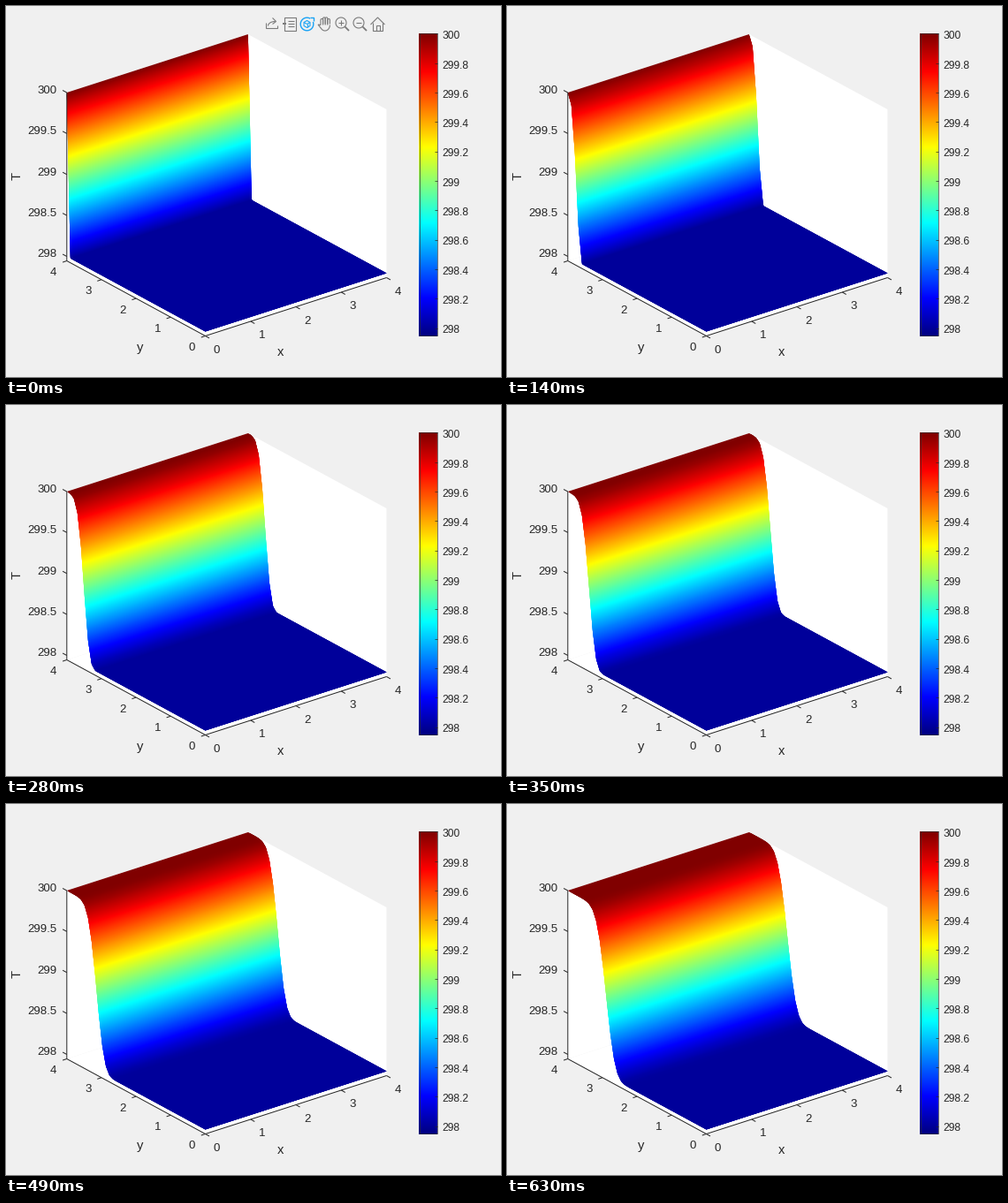
Animation, 560 px wide and 420 px high, one loop 0.7 s. Source, as a matplotlib script:

```python
from math import comb

import numpy as np
import matplotlib.pyplot as plt
from matplotlib.animation import FuncAnimation
from matplotlib.collections import PolyCollection
from matplotlib.patches import Polygon, Rectangle

W, H, DPI = 560, 420, 100
FRAMES, INTERVAL = 10, 70
PX = 72 / DPI
INK, GREY, BLUE = "#262626", "#7a7a7a", "#1aa3f5"

SIDE, Z_LO, Z_HI, T_COLD = 4, 297.946, 300.0, 298.0
CELLS, COURANT = 39, 0.6

# screen vectors of the whole box edges
ORIGIN = np.array([225.0, 373.0])
X_EDGE = np.array([205.0, -66.0])
Y_EDGE = np.array([-156.7, -85.0])
Z_EDGE = np.array([0.0, -190.5])

plt.rcParams["font.family"] = "Liberation Sans"
fig = plt.figure(figsize=(W / DPI, H / DPI), dpi=DPI, facecolor="#f0f0f0")
ax = fig.add_axes([0, 0, 1, 1])


def height(t):
    return (np.asarray(t) - Z_LO) / (Z_HI - Z_LO)


def project(x, y, z):
    u, v, w = (np.asarray(a, float)[..., None]
               for a in (x / SIDE, y / SIDE, height(z)))
    return ORIGIN + u * X_EDGE + v * Y_EDGE + w * Z_EDGE


def jet(t):
    return np.clip(1.5 - np.abs(4 * height(t)[..., None] - [3, 2, 1]), 0, 1)


def line(pts, color=INK, width=1.0, z=5):
    xs, ys = zip(*pts)
    return ax.plot(xs, ys, color=color, lw=width * PX, zorder=z,
                   solid_capstyle="butt", solid_joinstyle="miter")[0]


def label(x, y, text, size, ha="center"):
    """Place text with its capitals centred on y."""
    ax.text(x, y + 0.35 * size, text, size=size * PX, color=INK, ha=ha,
            va="baseline", zorder=6)


def draw_box():
    for start, a, b in ((ORIGIN, X_EDGE, Y_EDGE),
                        (ORIGIN + X_EDGE, Y_EDGE, Z_EDGE),
                        (ORIGIN + Y_EDGE, X_EDGE, Z_EDGE)):
        ax.add_patch(Polygon([start, start + a, start + a + b, start + b],
                             fc="white", lw=0, zorder=1))
    line([ORIGIN + X_EDGE, ORIGIN, ORIGIN + Y_EDGE, ORIGIN + Y_EDGE + Z_EDGE])

    for v in range(SIDE + 1):
        p = project(v, 0, Z_LO)
        line([p, p + (4.5, 2.5)])
        label(p[0] + 13, p[1] + 14.5, str(v), 13.3)
        p = project(0, v, Z_LO)
        line([p, p + (-4.7, 1.6)])
        label(p[0] - 15, p[1] + 12, str(v), 13.3)
    for v in np.arange(T_COLD, Z_HI + 0.1, 0.5):
        p = project(0, SIDE, v)
        line([p, p + (-4.7, -2.5)])
        label(57, p[1] - 3.7, f"{v:g}", 13.3, "right")

    label(310, 390, "x", 14.7)
    label(151.5, 385, "y", 14.7)
    ax.text(12, 192, "T", size=14.7 * PX, color=INK, rotation=90,
            ha="center", va="center")


def draw_colorbar():
    left, right, top, bottom = 467, 487, 31, 373
    ramp = jet(np.linspace(Z_HI, Z_LO, 256))[:, None, :]
    ax.imshow(ramp, extent=(left - 0.5, right + 0.5, bottom + 0.5, top - 0.5),
              aspect="auto", interpolation="bilinear", zorder=3)
    ax.add_patch(Rectangle((left, top), right - left, bottom - top, fill=False,
                           ec=INK, lw=0.6 * PX, zorder=4))
    for v in np.linspace(T_COLD, Z_HI, 11):
        y = bottom + (top - bottom) * height(v)
        line([(right - 3, y), (right, y)], width=0.7)
        label(492.5, y + 1.5, f"{v:.4g}", 12, "left")


def arc(cx, cy, rx, ry, start=0, stop=360):
    a = np.radians(np.linspace(start, stop, 40))
    return list(zip(cx + rx * np.cos(a), cy + ry * np.sin(a)))


def draw_toolbar():
    parts = []

    def stroke(pts, color=GREY, width=1.1):
        parts.append(line(pts, color, width, 8))

    def frame(x, y, w, h):
        parts.append(ax.add_patch(Rectangle((x, y), w, h, fill=False, ec=GREY,
                                            lw=1.1 * PX, zorder=8)))

    # export: tray and bent arrow
    stroke([(293, 19), (293, 25), (306, 25), (306, 22)])
    stroke(arc(304, 22, 8, 5, 180, 270))
    stroke([(301, 13), (305, 17), (301, 20)])

    # data tip
    frame(314.5, 12.5, 13, 15)
    for y in (17, 20, 23):
        stroke([(318, y), (325, y)])
    stroke([(312, 20), (316, 20)], width=2)

    # rotate: cube inside a turning arrow
    stroke(arc(340, 20, 7.3, 7.3, -20, 300), BLUE, 1.4)
    stroke([(343, 12.5), (347, 12.5), (347, 16.5)], BLUE, 1.4)
    cube = [(340 + 4 * np.sin(a), 20 - 4 * np.cos(a))
            for a in np.radians(range(0, 361, 60))]
    stroke(cube, BLUE)
    for corner in cube[1:6:2]:
        stroke([(340, 20), corner], BLUE)

    # pan: four fingers, palm and thumb
    for k in range(4):
        x, tip = 356.8 + 2.6 * k, 13.5 + 0.8 * (k - 1.5) ** 2
        stroke([(x - 1.3, 21), *arc(x, tip, 1.3, 1.3, 180, 360), (x + 1.3, 20)])
    stroke([*arc(360.4, 21, 5.5, 6.5, 0, 130), (352.5, 20.5), (355.5, 21)])

    # zoom in and out
    for x in (378.5, 398.5):
        stroke(arc(x, 18.5, 6, 6))
        stroke([(x + 4.3, 22.8), (x + 9, 27.5)], width=1.8)
        stroke([(x - 3, 18.5), (x + 3, 18.5)])
    stroke([(378.5, 15.5), (378.5, 21.5)])

    # home
    stroke([(412, 20.5), (420, 12.5), (428, 20.5)])
    stroke([(414.5, 18.5), (414.5, 27.5), (425.5, 27.5), (425.5, 18.5)])
    frame(418, 22, 4, 5.5)
    return parts


def profile(steps):
    """Upwind advection of a hot wall: binomial tail over the cells."""
    p = [comb(steps, k) * COURANT**k * (1 - COURANT)**(steps - k)
         for k in range(steps + 1)]
    tail = [sum(p[j:]) for j in range(CELLS + 1)]
    return T_COLD + (Z_HI - T_COLD) * np.array(tail)


def strips(steps):
    """Cut the surface into bands one pixel long on screen, with colours."""
    y, t = np.linspace(SIDE, 0, CELLS + 1), profile(steps)
    hops = np.diff(project(0 * y, y, t), axis=0)
    run = np.append(0, np.cumsum(np.hypot(*hops.T)))
    # keep the grid nodes so that the kinks stay sharp
    s = np.union1d(np.arange(0, run[-1]), run)
    y, t = np.interp(s, run, y), np.interp(s, run, t)
    near = project(0 * y, y, t)
    far = near + X_EDGE
    # each band reaches under the next ones, so no seams show
    a = np.arange(len(s) - 1)
    b = np.minimum(a + 4, len(s) - 1)
    quads = np.stack([near[a], far[a], far[b], near[b]], axis=1)
    return quads, jet((t[:-1] + t[1:]) / 2)


draw_box()
draw_colorbar()
toolbar = draw_toolbar()
surface = PolyCollection([], linewidths=0, zorder=2)
ax.add_collection(surface)
ax.set(xlim=(-0.5, W - 0.5), ylim=(H - 0.5, -0.5))
ax.axis("off")


def update(i):
    quads, colors = strips(max(2 * i - 1, 0))
    surface.set_verts(quads)
    surface.set_facecolor(colors)
    for part in toolbar:
        part.set_visible(i == 0)
    return [surface, *toolbar]


anim = FuncAnimation(fig, update, frames=FRAMES, interval=INTERVAL,
                     repeat=True, repeat_delay=0, blit=False)
plt.show()
```
